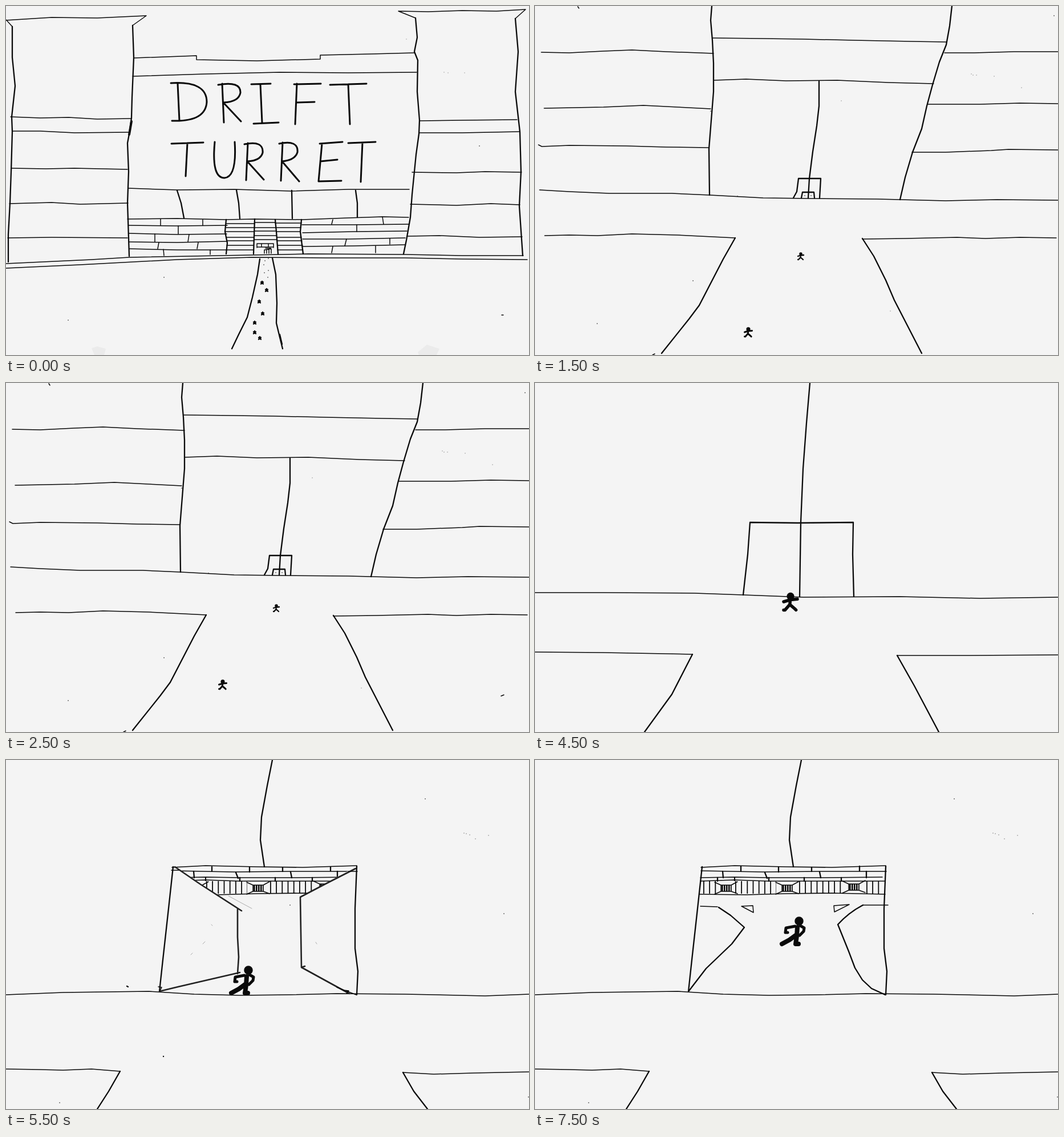
Write an HTML page that moves like this. It is 917 px wide and 611 px high and loops after 8 s.

```html
<!DOCTYPE html>
<html lang="en">
<head>
<meta charset="utf-8">
<title>Drift Turret</title>
<style>
  html, body { margin: 0; width: 100%; height: 100%; overflow: hidden; background: #f4f4f4; }
  svg { display: block; width: 100vw; height: 100vh; }
  path, circle { fill: none; stroke: #0a0a0a; stroke-width: 1.5; stroke-linecap: round; stroke-linejoin: round; }
  .thick { stroke-width: 2.3; }
  .bold { stroke-width: 3; }
  .door { stroke: #222; stroke-width: 2.6; }
  .limb { stroke-width: 8; }
  .solid { fill: #0a0a0a; }
  .smudge { fill: #ebebeb; stroke: none; }
  .bars { stroke-width: 22; stroke-linecap: butt; stroke-dasharray: 1.8 8.4; }
  [data-at] { visibility: hidden; }
</style>
</head>
<body>
<svg viewBox="0 0 917 611" preserveAspectRatio="none">
<defs>
  <g id="man">
    <circle class="solid" cy="-4" r="2"/>
    <path class="thick" d="M0-3L-.5 2-4 6H-5M-.5 2L3 5 4 6M-5 0L0-1.5 5-2"/>
  </g>
  <g id="star">
    <path class="thick" d="M0-2V1L-2 2.5M0 1L2 2.5M-2-.5H2"/>
  </g>
  <g id="walker">
    <circle class="solid" cx="425" cy="368" r="7"/>
    <path class="limb" d="M422 379L421 394 419 408 424 408M419 393L408 401 395 408"/>
    <path style="stroke-width:5" d="M418 377L402 380 401 388 405 388M427 376L434 380 433 386 426 393"/>
  </g>
  <g id="vent">
    <path d="M-20-10L-9-5H9L20-11M-20 11L-9 6H9L20 10M-9-5V6M9-5V6"/>
    <path d="M-8 .5H9" style="stroke-width:11;stroke-dasharray:2.6 1.4;stroke-linecap:butt"/>
  </g>
  <g id="bricks">
    <path d="M291 194L400 196 500 195 616 195M290 206L350 205 410 206 500 206 609 205M290 212L350 210 408 212 540 212 614 212M288 235L370 236 440 234 520 233 614 235"/>
    <path class="thick" d="M361 186V194M427 188V196M485 188V195M569 186V194M329 195L330 206M403 197L407 207M499 196L501 206M581 195V206M320 206V212M350 206V211M410 206V212M472 206V212M537 206V212"/>
    <path class="bars" d="M295 223H320M351 223H423M463 223H537M581 223H609"/>
    <use href="#vent" x="335" y="224"/><use href="#vent" x="442" y="224"/><use href="#vent" x="559" y="222"/>
  </g>
  <clipPath id="ceiling"><path d="M296 186L613 187 522 237 372 237Z"/></clipPath>
</defs>

<!-- castle front -->
<g data-at="0">
  <path class="thick" d="M11 36L11 90 16 140 10 194 11 220 9 290 7 345 4 400 4 448M222 34L224 90 221 160 220 196 216 224 213 240 215 290 213 345 214 375 216 438M718 21L721 55 716 80 722 95 721 150 725 200 724 224 719 260 712 330 709 370 702 410 697 434M893 22L898 80 893 150 901 220 903 290 900 350 906 437"/>
  <path class="thick" style="stroke-width:4" d="M220 202L216 225"/>
  <path d="M0 25L80 20 160 21 246 17 222 34M0 24L11 36M718 21L688 9 740 10 800 8 860 9 911 6 893 22"/>
  <path d="M8 194L60 196 110 195 160 198 220 197M12 219L60 219 120 222 216 221M9 284L70 285 120 284 213 286M6 346L80 344 130 347 214 345M3 406L80 405 213 406"/>
  <path d="M726 201L800 200 896 199M724 222L800 222 900 220M712 291L790 292 840 290 904 291M709 347L790 349 850 346 901 348M704 403L760 402 830 405 905 404"/>
  <path d="M224 91L334 87V94L440 96 551 93V86L640 84 716 82M222 123L350 119 480 116 600 117 720 116M214 319L300 322 400 321 500 324 600 321 707 321"/>
  <path class="thick" d="M300 323L307 345 312 371M404 322L408 345 410 372M501 323L502 372M613 323L616 345 616 370"/>
  <path d="M213 373L300 372 385 374 436 373 520 374 600 371 660 369 706 370M215 384L300 385 388 384M215 398L300 400 387 399M216 413L300 414 388 412M216 425L300 427 387 427M519 383L610 383 706 382M520 397L610 395 703 394M520 408L600 408 700 406M520 421L610 420 700 418"/>
  <path d="M271 373V384M345 374V384M302 385V399M261 399V413M321 400L319 413M337 414L335 425M268 414L266 425M276 426L277 437M358 427V435M573 374L571 382M660 369L662 382M615 383V395M597 408L594 420M673 407V417M573 421L571 432M648 420V432"/>
  <path class="thick" d="M386 374L384 395 388 415 386 434M436 373L434 434M472 374L474 395 477 434M518 374L516 395 521 434"/>
  <path d="M386 381H436M386 388H436M385 395H435M387 405H434M387 411H434M387 419H434M386 427H434M436 379H472M436 388H473M436 394H474M435 402H474M435 409H475M472 380H518M474 388H517M474 395H516M475 405H518M475 411H519M476 419H520M476 427H520"/>
  <path d="M440 423V416H469V423M440 422H469M448 416V422M460 416V422M453 433V427L465 425V433M457 426V433M461 426V433M455 424H464"/>
  <path d="M0 451L150 444 216 440 430 436 530 434 700 435 800 437 907 437M0 459L130 453 300 444 430 440 560 441 700 441 800 443 914 444"/>
  <path class="thick" d="M445 443L441 470 432 510 423 545 408 575 396 600M467 441L473 470 475 520 474 555 480 580 485 600M480 575L484 592"/>
  <use href="#star" x="449" y="484"/><use href="#star" x="457" y="497"/><use href="#star" x="444" y="517"/><use href="#star" x="450" y="538"/><use href="#star" x="436" y="554"/><use href="#star" x="436" y="571"/><use href="#star" x="445" y="581"/>
  <path d="M453 467h.1M459 475h.1M452 453h.1M460 442h.1M460 463h.1M454 446h.1M277 475h.1M109 550h.1M830 245h.1M869 541L872 541"/>
  <path style="stroke-width:.7" d="M702 58h.1M768 116h.1M775 117h.1M804 117h.1"/>
  <path class="smudge" d="M150 599L160 596 175 600 172 611H155ZM722 606L738 593 760 600 755 611H724Z"/>
  <g role="img" aria-label="DRIFT TURRET">
    <path class="bold" d="M301 136L304 201M289 135Q352 131 352 168 350 203 291 201M379 136L382 204M372 138Q412 131 411 152 408 168 381 169L412 202M430 137L464 136M446 137L449 204M434 206L478 204M510 136L507 207M505 137L552 136M509 169L541 168M568 138L632 136M600 137L603 207"/>
    <path class="bold" d="M290 241L346 239M318 240L315 298M366 238Q360 301 383 301 405 299 401 238M424 240L421 305M418 242Q452 235 450 257 446 271 423 272L452 304M485 239L482 306M479 241Q513 234 511 256 507 270 484 272L514 307M554 241L548 307 588 306M550 241L590 238M551 272L581 269M600 240L648 238M625 239L622 308"/>
  </g>
</g>

<!-- nearer wall -->
<g data-at="1">
  <path class="thick" d="M174 6L176 30 172 80 180 110 185 145 186 180 179 210 179 245 175 280 175 305 183 360 185 420M388 6L384 50 378 100 374 150 366 195 361 240 356 290 364 340 361 390 361 430M608 4L606 40 600 100 597 160 596 210 586 247M588 247L584 280 586 300 579 345 572 385 568 430M789 4L787 60 779 110 776 210 769 250 771 270 765 325 757 380 747 434"/>
  <path class="bold" d="M184 142V149M172 82V85M586 288V300M774 206V214M572 385L569 394"/>
  <path d="M4 53L120 45 173 46M4 117L90 117 150 112 181 116M4 177L100 178 185 177M4 222L80 223 177 220M4 282L80 281 120 280 175 283M4 339L60 338 110 340 181 338M3 384L80 384 179 386"/>
  <path d="M174 83L220 80 290 81 381 77M186 146L280 142 374 141M182 197L270 196 366 194M180 245L270 242 360 243M175 306L220 301 357 298M183 361L270 359 359 359"/>
  <path d="M380 45L490 44 606 40M382 101L500 99 597 97M374 163L480 163 540 160 592 157M362 226L430 223 510 225 590 224M357 289L450 286 584 283M357 347L430 349 510 346 578 349"/>
  <path d="M607 62L700 62 789 59M599 128L650 126 775 123M604 202L630 199 670 194 773 196M590 247L680 247 767 250M587 297L640 298 765 301M579 360L670 358 758 360"/>
  <path d="M784 74L850 71 915 71M778 139L850 141 915 139M776 211L850 209 915 210M771 270L840 270 915 267M765 327L915 327M756 384L915 384"/>
  <path d="M360 384L450 384 500 387 568 387M362 405L410 407 456 409M509 410L563 411"/>
  <path class="thick" d="M436 349L438 366 432 384M536 347L533 387M484 386L483 404M458 429L460 403H508V429M468 429L470 404M497 404V429M470 412H497M482 412V428M476 428V421H486V429"/>
  <path d="M459 410H468M458 418H468M497 412H508M497 419H508M472 407H495M477 425H486"/>
  <path class="bold" d="M490 412H495M477 427H485"/>
  <path d="M5 425L100 424 200 427 400 430 560 430 740 432 915 428M10 435L100 433 250 438 440 441M522 437L680 442 800 438 889 436"/>
  <path class="thick" d="M438 441L428 475 405 525 382 573 386 571 366 610M522 437L540 490 556 560 578 610M432 464L429 475"/>
  <use href="#star" x="456" y="461"/><use href="#star" x="450" y="547"/><use href="#star" x="483" y="586"/><use href="#star" x="428" y="608"/>
  <path d="M481 433H484M309 0h2M731 0h2M902 0h2M207 611h2M676 611h2M640 128h1M88 359h.1M6 591h.1"/>
  <path style="stroke-width:.7" d="M113 487h.1M142 488h.1M149 488h.1M152 490h.1M64 465h.1M215 546h.1M809 53h.1"/>
</g>

<!-- gate -->
<g data-at="2 3 4">
  <path class="thick" d="M310 0L308 25 311 60 313 100 313 150 309 200 305 250 306 331M731 0L727 35 721 68 709 98 697 138 687 175 678 215 662 256 649 300 640 339M498 132L498 175 494 210 487 255 481 302 479 336"/>
  <path d="M311 56L400 57 470 58 560 60 660 62 722 63M314 130L370 128 440 131 530 130 620 134 699 136"/>
  <path d="M11 81L60 82 120 79 170 77 230 80 313 83M16 179L120 177 190 174 250 177 308 180M6 243L12 246 60 244 160 245 230 247 304 248M718 82L770 82 840 80 917 80M688 172L780 172 850 170 917 171M661 256L720 256 800 253 830 251 917 252"/>
  <path d="M8 322L60 325 130 328 240 328 306 331 400 336 480 337 600 338 720 341 810 339 917 340M17 402L60 401 110 402 170 399 250 401 351 406M574 408L650 407 740 405 790 407 850 405 914 406"/>
  <path class="thick" d="M351 406L330 443 288 524 270 548 222 608M574 407L594 438 615 480 630 515 678 608"/>
  <path class="thick" d="M453 336L459 325 462 302H501L499 336M467 336L469 326H489L490 336"/>
  <path d="M473 332h.1M484 332h.1M75 1L77 4M308 184h.1M355 333h.1M277 481h.1M109 556h.1M910 17h.1"/>
  <path style="stroke-width:.8" d="M765 119h.1M768 121h.1M774 121h.1M805 123h.1M853 143h.1M537 166h.1M623 534h.1"/>
</g>
<g data-at="2">
  <use href="#man" x="466" y="438"/><use href="#man" transform="translate(374 571)scale(1.3)"/>
</g>
<g data-at="2 3"><path d="M206 611L210 609"/></g>
<g data-at="3">
  <use href="#man" x="474" y="394"/><use href="#man" transform="translate(380 528)scale(1.3)"/>
</g>
<g data-at="3 4"><path d="M868 548L873 546"/></g>
<g data-at="4">
  <use href="#man" x="480" y="351"/><use href="#man" transform="translate(388 485)scale(1.3)"/><use href="#man" transform="translate(549 601)scale(1.2)"/>
  <path class="thick" d="M158 611L163 609M735 609L740 611"/>
</g>

<!-- at the gate -->
<g data-at="5">
  <path class="thick" d="M482 0L476 70 470 150 466 244 464 374M365 371L373 300 377 244 460 245 558 244 557 300 559 374"/>
  <path d="M0 367L120 367 280 368 365 371 470 375 640 374 780 377 917 375M0 471L120 472 276 475M635 477L760 477 917 476"/>
  <path class="thick" d="M276 475L240 545 192 611M635 477L665 530 708 611"/>
  <use href="#man" transform="translate(448 383)scale(2.4)"/>
</g>

<!-- doorway -->
<g data-at="6 7 8">
  <path class="thick" d="M467 0L458 45 448 100 446 140 453 187M293 187L285 260 275 350 269 405M615 186L612 260 612 330 617 370 615 411M200 545L180 580 160 611M696 547L715 580 739 611"/>
  <path d="M291 188L350 185 440 187 520 188 615 185M0 411L100 407 250 405 330 410 410 412 500 411 580 409 700 410 840 413 917 410M0 541L60 542 100 543 150 541 200 545M917 546L820 548 750 550 696 547"/>
  <path d="M735 68h.1M873 269h.1M94 600h.1M916 590h.1"/>
  <path style="stroke-width:1" d="M803 128h.1M807 129h.1M813 131h.1M823 138h.1M846 132h.1"/>
</g>
<g data-at="6 7"><path class="thick" d="M212 396L214 397M276 519h.1"/></g>
<g data-at="6">
  <g clip-path="url(#ceiling)"><use href="#bricks"/></g>
  <path class="door" d="M296 187L340 217 413 264M406 261L406 310 408 345 406 374M410 372L302 397 269 405M613 190L560 217 516 240 518 363 602 409M518 363L524 361"/>
  <path d="M580 398L614 411M592 403L601 404 597 409M267 397L273 398 270 404M290 193H303M600 195H616M498 254h.1"/>
  <path style="stroke:#aaa;stroke-width:1" d="M345 322L349 318M324 341L327 338M360 288L362 290M543 319L545 322M390 238L431 260"/>
  <use href="#walker"/>
</g>
<g data-at="7 8">
  <use href="#bricks"/>
  <path d="M290 256L320 257M619 254L575 254"/>
  <path class="thick" d="M322 258L343 272 367 293 345 322 300 365 270 404M575 254Q550 267 531 288L550 335 561 364 574 385 590 400 614 411"/>
  <path d="M362 256L382 255 383 267ZM524 255L551 253 525 266Z"/>
</g>
<g data-at="7"><use href="#walker" x="19" y="-43"/></g>
<g data-at="8"><use href="#walker" x="38" y="-86"/></g>
</svg>
<script>
  const layers = [...document.querySelectorAll('[data-at]')].map(el => ({ el, at: el.dataset.at.split(' ').map(Number) }));
  let shown = -1;

  // The opening view lasts half a second, every later one a second.
  function draw() {
    const view = Math.floor((performance.now() % 8000 + 500) / 1000);
    if (view !== shown) {
      shown = view;
      for (const { el, at } of layers) el.style.visibility = at.includes(view) ? 'visible' : 'hidden';
    }
    requestAnimationFrame(draw);
  }
  draw();
</script>
</body>
</html>
```
